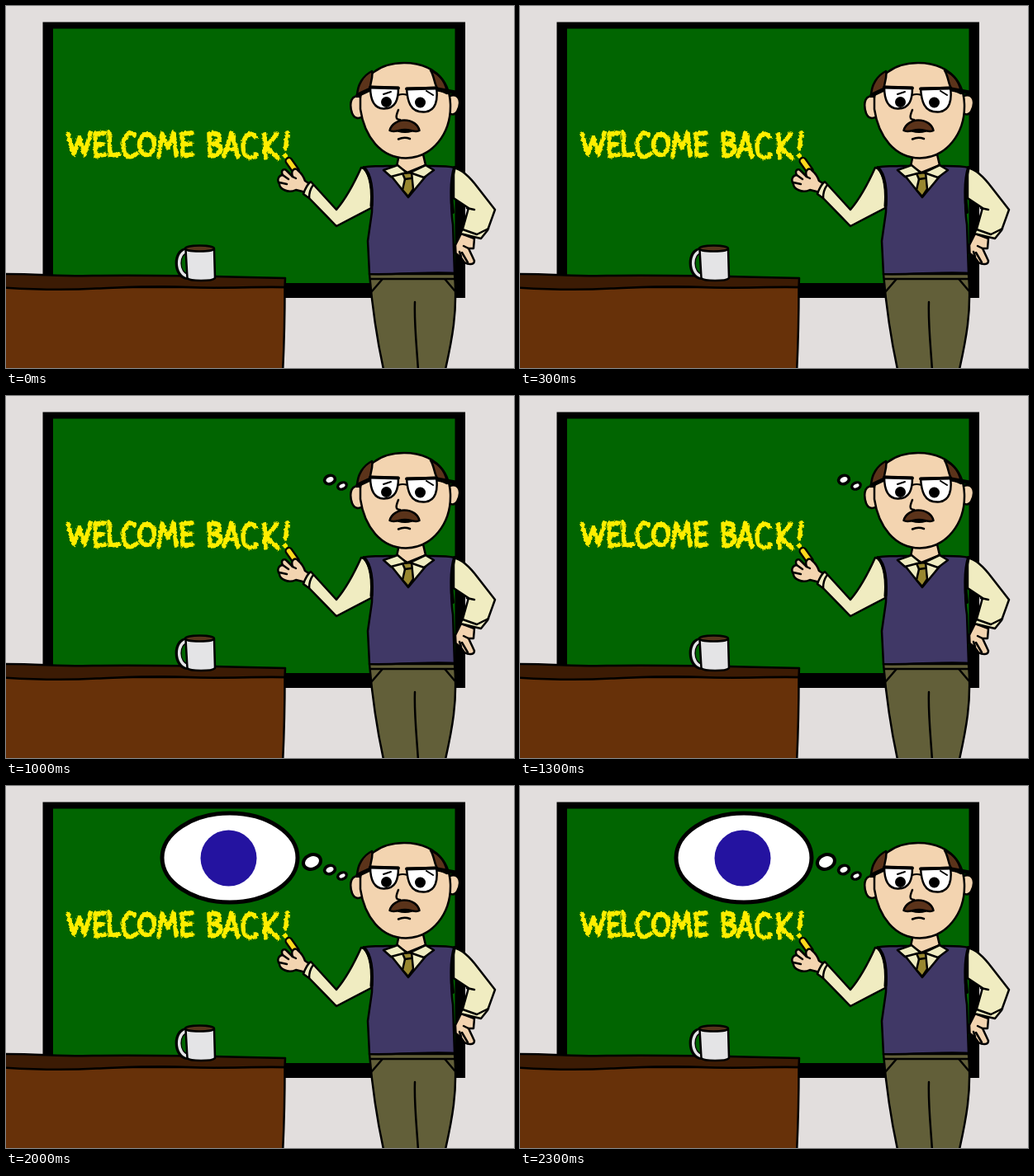
Animation of 615 by 439 pixels, one loop 2500 ms. Source, as an HTML page:

```html
<!DOCTYPE html>
<html lang="en">
<head>
<meta charset="utf-8">
<title>Welcome back</title>
<style>
html, body { margin: 0; width: 100%; height: 100%; overflow: hidden; background: #e2dedd; }
svg { display: block; width: 615px; height: 439px; }
.ink { stroke: #000; stroke-width: 2.5; stroke-linejoin: round; stroke-linecap: round; }
.line { fill: none; }
.skin { fill: #f3d4b0; }
.shirt { fill: #f0ecc1; }
.hair { fill: #5b331a; }
.vest { fill: #403866; }
.pants { fill: #625f39; }
.lens { fill: #fff; }
.chalk { fill: none; stroke: #ffed00; stroke-width: 5.4; stroke-linecap: round; stroke-linejoin: round; }
.thought { fill: #fff; stroke: #000; visibility: hidden; animation: 2.5s step-end infinite; }
.t1 { animation-name: at1; }
.t2 { animation-name: at2; }
.t3 { animation-name: at3; }
.t4 { animation-name: at4; }
@keyframes at1 { 0% { visibility: hidden } 20%, 100% { visibility: visible } }
@keyframes at2 { 0% { visibility: hidden } 40%, 100% { visibility: visible } }
@keyframes at3 { 0% { visibility: hidden } 60%, 100% { visibility: visible } }
@keyframes at4 { 0% { visibility: hidden } 80%, 100% { visibility: visible } }
</style>
</head>
<body>
<svg viewBox="0 0 615 439">
  <defs>
    <filter id="rough" x="-5%" y="-20%" width="110%" height="140%">
      <feTurbulence type="fractalNoise" baseFrequency=".3" numOctaves="2" seed="4"/>
      <feDisplacementMap in="SourceGraphic" scale="4" xChannelSelector="R" yChannelSelector="G"/>
    </filter>
  </defs>

  <!-- board -->
  <path d="M44.500 19.500H556V354H44.500Z"/>
  <path d="M57 27.500H543.500V336H57Z" fill="#016501"/>

  <!-- chalk lettering -->
  <g class="chalk" role="img" aria-label="WELCOME BACK!" filter="url(#rough)">
    <path d="M75 155L82 180L89 160L95 180L102 154"/>
    <path d="M119 154L108 155L109 182L120 180M109 168L118 167"/>
    <path d="M125 153L126 181L137 180"/>
    <path d="M156 157C149 149 142 160 142 169C142 183 150 186 158 179"/>
    <ellipse cx="170.500" cy="168" rx="9" ry="12.500"/>
    <path d="M185 182L189 155L196 172L203 154L206 181"/>
    <path d="M225 154L213 155L214 181L226 180M214 168L224 167"/>
    <path d="M247 182L246 155C263 151 262 166 248 167C265 166 263 182 247 182"/>
    <path d="M264 182L273 154L281 183M267 174L279 173"/>
    <path d="M302 159C295 149 287 160 287 170C287 184 296 187 303 180"/>
    <path d="M313 156L314 184M328 155L315 171L330 185"/>
    <path d="M340.500 154L338.500 173M338 181.500L338.500 182"/>
  </g>

  <!-- desk -->
  <g class="ink">
    <path d="M-4 341H337.500C337.500 375 337 405 335 445H-4Z" fill="#673109"/>
    <path d="M-4 325C40 325 70 328 105 327C165 326 230 327 338 330L337.500 341C300 340 262 343 222 341C180 339 150 341 110 342.500C70 345 35 344 -4 341.500Z" fill="#3c1b04"/>
  </g>

  <!-- mug -->
  <g class="line">
    <path d="M219 297C205 297 205 327 220 328" stroke="#000" stroke-width="8"/>
    <path d="M220 297C206 298 206 326 221 328" stroke="#e4e4e6" stroke-width="3.400"/>
  </g>
  <g class="ink">
    <path d="M217.500 295L219.500 330C222 334 250 334 253 330L252 295Z" fill="#e4e4e6"/>
    <ellipse cx="234.500" cy="294" rx="17.500" ry="3.600" fill="#56351b"/>
  </g>

  <!-- right arm -->
  <g class="ink">
    <path class="skin" d="M551 276L544 290L544.500 300L550 304L555 311C560 314 567 314 567 309L560 294L566 294L567 282Z"/>
    <path class="line" d="M560 294L554 291M551 304L549 298M559 311L552 299"/>
    <path class="shirt" d="M542 196C552 198 562 208 571 220L592 247L583 272L575 282L550 276L553 270L560 245L542 233Z"/>
    <path class="line" d="M553 271L570 277L584 270M558 245L567 247"/>
  </g>

  <!-- pointing arm -->
  <g class="ink">
    <path d="M342.500 188L351 200" stroke-width="10"/>
    <path d="M342.500 188L351 200" stroke="#ffd91c" stroke-width="5.500"/>
    <path class="skin" d="M363 226L351 223C341 228 331 221 331 216C327 210 331 205 335 205C332 199 337 196 340 200L347 207C344 198 351 195 354 200C359 204 361 209 362 212L368 216Z"/>
    <path class="line" d="M335 205L342 210M331 214L340 216M347 207L351 209"/>
    <path class="shirt" d="M430 196C421 216 412 233 400 247L369 213C365 216 362 222 360 228L367 233L400 267L442 245L444 215L434 197Z"/>
    <path class="line" d="M372 217C368 222 367 228 367 233"/>
  </g>

  <!-- trousers -->
  <g class="ink">
    <path class="pants" d="M440 325H543C547 370 540 405 531 445H458C449 405 444 372 440 325Z"/>
    <path class="line" d="M495 359C494 385 497 410 499 442M442 331H543"/>
    <path class="line" d="M455 332L443 346M532 332L543 345"/>
  </g>

  <!-- torso -->
  <g class="ink">
    <path class="vest" d="M433 196C440 193 450 195 460 194H516C526 194 536 194 543 196C538 218 538 245 541 265L543 324C510 322 475 326 440 325L438 285L443 250C444 225 442 205 433 196Z"/>
    <path class="line" d="M433 196C442 204 444 224 442.500 242M543 196C538 212 539 236 541 250" stroke-width="4"/>
    <path class="shirt" d="M463 202L487 232L511 203L500 193H474Z"/>
    <path class="skin" d="M476 180L473 194L486 202L508 193L505 180Z"/>
    <path d="M480 203L491 202L493 222L487 231L480 223L483 210Z" fill="#98872f"/>
    <path class="shirt" d="M474 193L457 199L466 207L485 202ZM508 193L518 199L506 208L489 202Z"/>
    <path class="line" d="M483 210L490 209"/>
  </g>

  <!-- head -->
  <g class="ink">
    <path class="skin" d="M430 111C418 105 415 118 419 130C422 137 427 137 432 134ZM537 109C549 105 552 117 546 128C543 133 539 132 535 129Z"/>
    <path class="skin" d="M429 112C431 85 452 69 482 69C514 69 537 87 538 119C539 155 516 184 484 184.500C454 184 434 159 429 125Z"/>
    <path class="hair" d="M443 79C433 84 425 95 425 110L441 101C440 94 445 87 443 79ZM514 78C526 83 533 94 534 106L523 101C518 95 519 86 514 78Z"/>
    <path class="line" d="M426 108L441 101M522 101L544 105" stroke-width="5"/>
    <path class="lens" d="M441 98L475 99C475 113 472 125 457 124.500C444 124 441 112 441 98ZM485 100L521 99C523 113 521 128 506 128.500C489 129 486 115 485 100Z"/>
    <path class="line" d="M441 98.500L475 99.500M485 100.500L521 99.500" stroke-width="3.800"/>
    <path class="line" d="M475 108Q480 106 486 108" stroke-width="2"/>
    <path class="line" d="M457 107L466 104M509 103L517 108" stroke-width="2"/>
    <path class="line" d="M475 126C473 131 470 138 477 138"/>
    <path class="hair" d="M464.500 151C466 144 474 138.500 482 138.500C492 138.500 499 144 500.500 151C496 154 491 150 483 150C475 150 470 154 464.500 151Z"/>
    <path d="M475 151.500Q483 154 491 151.500Z"/>
    <path class="line" d="M475 161.500Q482 158.500 489 161"/>
  </g>
  <circle cx="460.500" cy="116.500" r="6.500"/>
  <circle cx="501.500" cy="117" r="6.500"/>

  <!-- thought bubbles -->
  <g class="thought t1"><ellipse cx="407" cy="109" rx="5.500" ry="3.800" stroke-width="3.400" transform="rotate(-25 407 109)"/></g>
  <g class="thought t2"><ellipse cx="392" cy="101.500" rx="6.500" ry="5" stroke-width="3.600" transform="rotate(-20 392 101.500)"/></g>
  <g class="thought t3"><ellipse cx="370.500" cy="92" rx="10.800" ry="8.600" stroke-width="4" transform="rotate(-22 370.500 92)"/></g>
  <g class="thought t4">
    <ellipse cx="271" cy="87" rx="82" ry="54" stroke-width="5"/>
    <circle cx="269.500" cy="87.500" r="34" fill="#2413a0" stroke="none"/>
  </g>
</svg>
</body>
</html>
```
